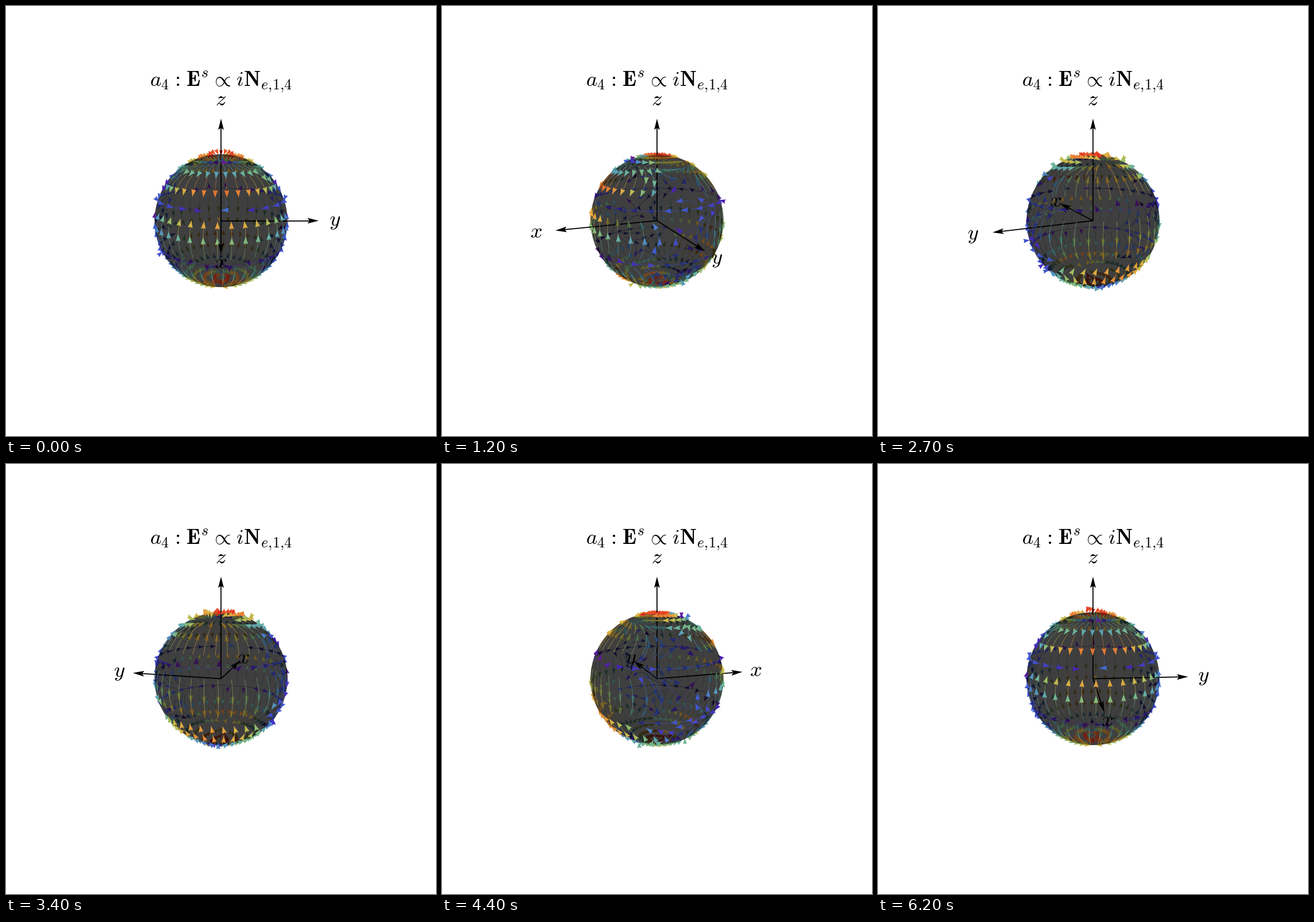
Animation of 748x748 px, one loop 6300 ms. Source, as a matplotlib script:

```python
import numpy as np
import matplotlib.pyplot as plt
from matplotlib.animation import FuncAnimation
from matplotlib.collections import LineCollection, PolyCollection

plt.rcParams["mathtext.fontset"] = "cm"

SIZE, DPI = 748, 64
PX = 72 / DPI                    # points per pixel
FRAMES, INTERVAL = 63, 100
CX, CY = 374, 373.5
RADIUS = 113.3                   # sphere radius in pixels at the centre's depth
DIST = 5.12                      # camera distance in sphere radii
ELEV = np.radians(14.3)
RIM = RADIUS / np.sqrt(1 - DIST ** -2)
HORIZON = 1 / DIST
FONT = 37 * PX

RAINBOW = np.array([
    (.400, .100, .560), (.275, .140, .727), (.248, .370, .830), (.323, .580, .763),
    (.400, .690, .640), (.540, .740, .450), (.730, .740, .330), (.860, .700, .260),
    (.905, .570, .220), (.905, .420, .180), (.880, .131, .120)])


def rainbow(v):
    stops = np.linspace(0, 1, len(RAINBOW))
    return np.column_stack([np.interp(v, stops, ch) for ch in RAINBOW.T])


def field(lat, lon):
    """North and east parts of the tangential vector harmonic N_e14."""
    c, s = np.sin(lat), np.cos(lat)
    tau = 2.5 * (28 * c ** 4 - 27 * c ** 2 + 3)
    pi = 2.5 * (7 * c ** 3 - 3 * c)
    return tau * np.cos(lon), pi * np.sin(lon)


def heading(lat, lon):
    north, east = field(lat, lon)
    east = east / np.maximum(np.cos(lat), .02)
    norm = np.hypot(north, east) + 1e-9
    return north / norm, east / norm


def trace(lat, lon, step, count):
    path = []
    top = np.radians(89)
    for _ in range(count):
        a, b = heading(lat, lon)
        a, b = heading(lat + a * step / 2, lon + b * step / 2)
        lat, lon = np.clip(lat + a * step, -top, top), lon + b * step
        path.append((lat, lon))
    return path


def seeds():
    # latitude, number of columns, shift of the columns in degrees
    rows = [(56, 35, 5.14), (40, 35, 5.14), (4.5, 35, -2.6), (-7, 35, -2.6),
            (-45, 35, 2), (-58, 35, 5.14), (21, 27, 3), (-21, 27, 5),
            (66, 27, 4), (-66, 27, 6), (75, 27, 5.14), (-75, 27, 5.14),
            (83, 18, 0), (-83, 18, 0), (-33, 35, 2)]
    pts = [(lat, shift + 360 * k / n) for lat, n, shift in rows for k in range(n)]
    # The swirls to either side of the y axis take extra arrows.
    rng = np.random.default_rng(4)
    extra = rng.uniform((-60, -35), (60, 35), (300, 2))
    extra[:, 1] += np.where(np.arange(300) % 2, 90, 270)
    return np.radians(np.vstack([pts, extra])).T


def build_streams():
    lat, lon = seeds()
    step, half = np.radians(.75), 12
    path = trace(lat, lon, -step, half)[::-1] + [(lat, lon)] + trace(lat, lon, step, half)
    path = np.degrees(np.array(path))            # (point, lat/lon, stream)
    span = np.hypot(*(path[-1] - path[0]))
    keep, heads = [], []
    for i in range(len(lat)):
        tip = path[-1, :, i]
        if span[i] < 4:
            continue
        if heads:
            gap = np.array(heads) - tip
            gap[:, 1] = (gap[:, 1] + 180) % 360 - 180
            if np.min(np.hypot(gap[:, 0] / 6, gap[:, 1] / 9)) < 1:
                continue
        keep.append(i)
        heads.append(tip)
    path = np.radians(path[:, :, keep])
    strength = np.hypot(*field(*path[half // 2])) / 10
    la, lo = path[::2, 0].T, path[::2, 1].T
    xyz = np.stack([np.cos(la) * np.cos(lo), np.cos(la) * np.sin(lo), np.sin(la)], -1)
    return xyz, rainbow(strength)


def project(pts, az):
    """Screen x and y, depth towards the camera and perspective scale."""
    pts = np.asarray(pts, float)
    ca, sa, ce, se = np.cos(az), np.sin(az), np.cos(ELEV), np.sin(ELEV)
    depth = pts @ np.array([ce * ca, ce * sa, se])
    scale = DIST / (DIST - depth)
    x = CX + RADIUS * scale * (pts @ np.array([-sa, ca, 0]))
    y = CY - RADIUS * scale * (pts @ np.array([-se * ca, -se * sa, ce]))
    return np.stack([x, y], -1), depth, scale


def arrowheads(tip, way, length, half_width, notch):
    way = way / (np.linalg.norm(way, axis=-1, keepdims=True) + 1e-9)
    side = np.stack([-way[:, 1], way[:, 0]], -1) * half_width
    back = way * length
    return np.stack([tip, tip - back + side, tip - back * notch, tip - back - side], 1)


STREAMS, COLORS = build_streams()

fig = plt.figure(figsize=(SIZE / DPI, SIZE / DPI), dpi=DPI, facecolor="white")
ax = fig.add_axes([0, 0, 1, 1])
ax.set_xlim(0, SIZE)
ax.set_ylim(SIZE, 0)
ax.set_axis_off()

# Two half-transparent walls make the sphere; things lie behind, inside or before it.
for z in (2, 6):
    ax.add_patch(plt.Circle((CX, CY), RIM, fc=(0, 0, 0, .5), ec="none", lw=0, zorder=z))


def add_heads(z):
    return ax.add_collection(PolyCollection([], linewidths=0, zorder=z), autolim=False)


def add_lines(z):
    lines = LineCollection([], linewidths=.75 * PX, alpha=.65, zorder=z)
    return ax.add_collection(lines, autolim=False)


lines_back, lines_front = add_lines(1), add_lines(7)
heads_behind, heads_far, heads_near, heads_front = [add_heads(z) for z in (1.5, 3, 5, 8)]

ax.text(CX, 140.5,
        r"$a_4\hspace{0.08}:\hspace{0.08}\mathbf{E}^s\hspace{0.08}\propto\hspace{0.08}"
        r"i\mathbf{N}_{e{,}1{,}4}$",
        size=FONT, ha="center", va="baseline", zorder=10)


class Axis:
    def __init__(self, name, unit):
        self.unit = np.array(unit, float)
        style = dict(color="black", lw=1.8 * PX, solid_capstyle="butt")
        self.inner, = ax.plot([], [], zorder=4, **style)
        self.outer, = ax.plot([], [], **style)
        self.head = plt.Polygon(np.zeros((4, 2)), fc="black", ec="none")
        ax.add_patch(self.head)
        self.label = ax.text(0, 0, f"${name}$", size=FONT, ha="center", va="center")

    def draw(self, az):
        spots = self.unit * np.array([[0], [1], [1.5], [1.75]])
        (start, wall, tip, label), depth, _ = project(spots, az)
        head = arrowheads(tip[None], (tip - start)[None], 19.5, 4.9, .82)[0]
        self.inner.set_data(*np.transpose([start, wall]))
        self.outer.set_data(*np.transpose([wall, head[2]]))
        self.head.set_xy(head)
        self.label.set_position(label - (0, 1))
        z = 9 if depth[2] > -.01 else 0
        for part in (self.outer, self.head, self.label):
            part.set_zorder(z)


AXES = [Axis("x", (1, 0, 0)), Axis("y", (0, 1, 0)), Axis("z", (0, 0, 1))]


def update(frame):
    az = .1 * frame
    xy, depth, scale = project(STREAMS, az)
    mid = depth.shape[1] // 2
    order = np.argsort(depth[:, -1])
    xy, depth, scale, colors = xy[order], depth[order], scale[order], COLORS[order]

    before = depth[:, mid] > HORIZON
    for lines, pick in ((lines_back, ~before), (lines_front, before)):
        lines.set_segments(list(xy[pick]))
        lines.set_color(colors[pick])

    # Heads face the camera at their tip's depth, so those that point away sink in.
    grow = scale[:, -1:]
    polys = arrowheads(xy[:, -1], xy[:, -1] - xy[:, -3], 10.5 * grow, 3.5 * grow, .9)
    front = depth[:, -1] > HORIZON
    nearing = depth[:, -1] > depth[:, -3]
    for heads, pick in ((heads_behind, ~front & ~nearing), (heads_far, ~front & nearing),
                        (heads_near, front & ~nearing), (heads_front, front & nearing)):
        heads.set_verts(list(polys[pick]))
        heads.set_facecolor(colors[pick])

    for axis in AXES:
        axis.draw(az)
    return []


anim = FuncAnimation(fig, update, frames=FRAMES, interval=INTERVAL,
                     init_func=lambda: update(0), repeat=True, repeat_delay=0, blit=False)
plt.show()
```
